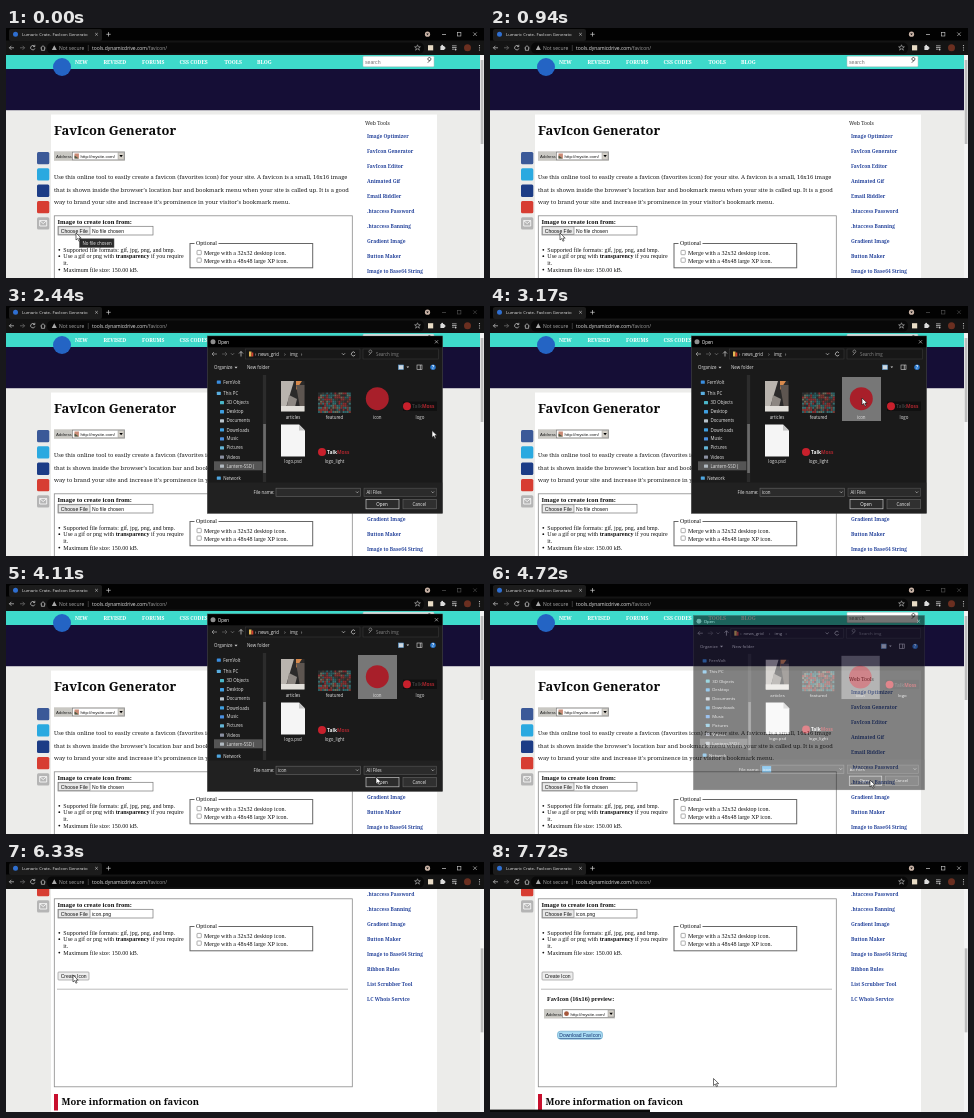
An HTML page that plays this animation: 478x250 px, repeating every 8000 ms.

```html
<!DOCTYPE html>
<html lang="en">
<head>
<meta charset="utf-8">
<title>FavIcon Generator</title>
<style>
html, body { margin: 0; width: 100%; height: 100%; overflow: hidden; background: #000; }
svg { display: block; width: 100%; height: 100%; }
text { white-space: pre; }
.ui { font-family: "Open Sans", sans-serif; }
.arial { font-family: "Liberation Sans", Arial, sans-serif; }
.times { font-family: "Liberation Serif", "Times New Roman", serif; }
.serif { font-family: "Noto Serif", Georgia, serif; }
.b { font-weight: bold; }
</style>
</head>
<body>
<svg id="stage" viewBox="0 0 478 250" preserveAspectRatio="none"></svg>
<script>
const LOOP = 8000;

// Markup helpers
const rect = (x, y, w, h, fill, more = '') =>
  `<rect x="${x}" y="${y}" width="${w}" height="${h}" fill="${fill}" ${more}/>`;
const frame = (x, y, w, h, stroke, fill = 'none', sw = 0.7, rx = 0) =>
  rect(x, y, w, h, fill, `stroke="${stroke}" stroke-width="${sw}" rx="${rx}"`);
const dot = (x, y, r, fill, more = '') => `<circle cx="${x}" cy="${y}" r="${r}" fill="${fill}" ${more}/>`;
const line = (d, stroke, sw = 0.7) => `<path d="${d}" fill="none" stroke="${stroke}" stroke-width="${sw}"/>`;
const shape = (d, fill) => `<path d="${d}" fill="${fill}"/>`;
const text = (cls, x, y, size, fill, str, more = '') =>
  `<text class="${cls}" x="${x}" y="${y}" font-size="${size}" fill="${fill}" ${more}>${str}</text>`;
const group = (id, body, more = '') => `<g id="${id}" ${more}>${body}</g>`;
const mid = 'text-anchor="middle"';
const cross = (x, y, r, c) => line(`M${x - r} ${y - r}l${2 * r} ${2 * r}m0 ${-2 * r}l${-2 * r} ${2 * r}`, c, 0.6);
const lens = (x, y, c) => line(`M${x + 1} ${y - 1}a1.5 1.5 0 1 0 -.1 .1l-2.6 2.6`, c, 0.8);

function addressBar(x, y, round) {
  return rect(x, y, 71, 9.5, '#c9c8c3') + frame(x + 18.5, y + 0.8, 52, 7.8, '#777', '#fff', 0.6) +
    text('arial', x + 2, y + 6.5, 4.3, '#222', 'Address') +
    (round ? dot(x + 22.5, y + 4.7, 2.4, '#a5573c')
           : rect(x + 20.5, y + 2.2, 4.4, 5, '#c98a75') + shape(`M${x + 20.5} ${y + 7.2}v-3l4.4 3z`, '#4a5a45')) +
    text('arial', x + 26.5, y + 6.6, 4.4, '#111', 'http://mysite.com/') +
    rect(x + 64, y + 1.5, 6, 6.4, '#d4d0c8', 'stroke="#888" stroke-width=".4"') +
    shape(`M${x + 65.4} ${y + 3.8}h3.4l-1.7 2.2z`, '#000');
}

function header() {
  const nav = [['NEW', 69], ['REVISED', 97.5], ['FORUMS', 136], ['CSS CODES', 173.5], ['TOOLS', 218.5], ['BLOG', 251]];
  return rect(0, 82, 478, 1, '#bcbac2') + rect(0, 41, 478, 41, '#150e36') + rect(0, 20, 478, 21, '#3edacb') +
    nav.map(([s, x]) => text('serif b', x, 36, 5.1, '#fff', s)).join('') +
    frame(357, 28.3, 71, 10.4, '#bbb', '#fff', 0.5, 1) +
    text('arial', 359, 35.5, 5.2, '#777', 'search') + lens(423.5, 33, '#333') +
    dot(56, 39, 9, '#2464c4');
}

function share() {
  const colors = ['#3b5998', '#2aa9e0', '#1c3c86', '#d73d32', '#b5b5b5'];
  return colors.map((c, i) => rect(31, 124 + i * 16.3, 12.3, 12.3, c, 'rx="1.5"')).join('') +
    line('M33.7 192.6h7v5.4h-7zl3.5 3 3.5 -3', '#fff', 0.8);
}

function sidebar() {
  const links = ['Image Optimizer', 'FavIcon Generator', 'FavIcon Editor', 'Animated Gif', 'Email Riddler',
    '.htaccess Password', '.htaccess Banning', 'Gradient Image', 'Button Maker', 'Image to Base64 String',
    'Ribbon Rules', 'List Scrubber Tool', 'LC Whois Service'];
  return text('serif', 359, 97.3, 5.1, '#222', 'Web Tools') +
    links.map((s, i) => text('serif b', 361, 110 + i * 15.02, 4.9, '#27459c', s)).join('');
}

function form() {
  const t = (x, y, s) => text('times', x, y, 6, '#111', s);
  const check = y => frame(191, y, 4.3, 4.3, '#777', '#fff', 0.6, 0.6);
  return frame(48.3, 187.8, 298, 188, '#8a8a8a', 'none', 0.8) +
    text('times b', 51.5, 196.3, 6.6, '#111', 'Image to create icon from:') +
    frame(52, 198.3, 95, 8.7, '#777', '#fff') + frame(52.4, 198.8, 31.6, 7.7, '#777', '#e9e9e9', 0.6) +
    text('arial', 54.8, 204.6, 5.05, '#111', 'Choose File') +
    `<text id="chosen" class="arial" x="86" y="204.6" font-size="5.05" fill="#111"></text>` +
    [221.8, 228.2, 241.6].map(y => dot(53.3, y, 0.9, '#111')).join('') +
    t(57.3, 223.6, 'Supported file formats: gif, jpg, png, and bmp.') +
    t(57.3, 230, 'Use a gif or png with <tspan font-weight="bold">transparency</tspan> if you require') +
    t(57.3, 236.8, 'it.') + t(57.3, 243.6, 'Maximum file size: 150.00 kB.') +
    frame(184, 215.5, 122.7, 24.3, '#666', 'none', 1) + rect(188.5, 213, 24, 5, '#fff') +
    t(190, 217.4, 'Optional') + check(222.4) + check(230) +
    t(198, 227, 'Merge with a 32x32 desktop icon.') + t(198, 234.7, 'Merge with a 48x48 large XP icon.') +
    frame(52, 261, 31, 8, '#888', '#eee', 0.6, 0.8) + text('arial', 54.7, 266.9, 5, '#111', 'Create Icon') +
    line('M51 278.2H342', '#aaa', 0.8);
}

const preview =
  text('times b', 57, 289.8, 6.2, '#111', 'FavIcon (16x16) preview:') + addressBar(54, 298, true) +
  frame(67.5, 320.2, 45, 8, '#5b9ec4', '#a9dcf3', 0.6, 3) +
  text('arial', 90, 326, 5, '#12306e', 'Download FavIcon', mid + ' text-decoration="underline"');

function page() {
  const para = ['Use this online tool to easily create a favicon (favorites icon) for your site. A favicon is a small, 16x16 image',
    "that is shown inside the browser's location bar and bookmark menu when your site is called up. It is a good",
    "way to brand your site and increase it's prominence in your visitor's bookmark menu."];
  return rect(0, 20, 478, 420, '#ececea') + rect(45, 86.5, 386, 350, '#fff') + header() + share() + sidebar() +
    text('serif b', 48, 106.7, 12.9, '#0a0a0a', 'FavIcon Generator') + addressBar(48, 123.3) +
    para.map((s, i) => text('serif', 48, 151 + i * 12.6, 5.78, '#1c1c1c', s)).join('') +
    form() + group('preview', preview) +
    rect(48, 383, 4, 16.5, '#c8102e') + text('serif b', 55.5, 394, 9.4, '#0a0a0a', 'More information on favicon');
}

function browser() {
  const c = '#cfcfcf';
  const controls = line('M436 6.5h4', c) + frame(451.3, 4.4, 3.6, 3.6, c, 'none', 0.6) + cross(469, 6.2, 1.8, c);
  return rect(0, 0, 478, 27, '#141414') + rect(0, 0, 478, 12.5, '#020202') +
    rect(3, 1, 93, 12, '#1c1c1c', 'rx="2"') + rect(41, 14.6, 377, 11, '#080808', 'rx="5"') +
    dot(9.5, 6.3, 2.5, '#2f6fd0') +
    text('ui', 16, 7.9, 4.3, '#e2e2e2', 'Lumaric Crate- FavIcon Generato') +
    cross(90.5, 6.3, 1.3, c) + line('M100.3 6.3h4.4m-2.2 -2.2v4.4', c) +
    dot(421.5, 6.2, 2.6, '#c9b3a6') + shape('M420.2 5.5h2.6l-1.3 1.7z', '#111') + group('controls', controls) +
    line('M8 19.8H3.4m2 -2l-2 2 2 2', c) + line('M14 19.8h4.6m-2 -2l2 2 -2 2', '#777') +
    line('M28.6 18.4a2.2 2.2 0 1 0 .3 2M28.8 16.8v1.8h-1.8', c) + line('M34.5 20l2.5 -2.3 2.5 2.3m-4.1 -.6v2.9h3.2v-2.9', c) +
    shape('M48.3 17.3l2.5 4.6h-5z', '#aaa') +
    text('ui', 53, 21.7, 5, '#a9a9a9', 'Not secure') + line('M82.3 17v6', '#666', 0.5) +
    text('ui', 86, 21.7, 4.95, '#e4e4e4', 'tools.dynamicdrive.com<tspan fill="#a0a0a0">/favicon/</tspan>') +
    line('M411.5 16.8l.8 2h2.1l-1.7 1.3.7 2.1-1.9-1.3-1.9 1.3.7-2.1-1.7-1.3h2.1z', '#bbb', 0.6) +
    rect(422, 17.2, 5.2, 5.2, '#e9dcc6') +
    rect(434.4, 18, 4, 4, '#ddd') + dot(436.2, 17.8, 1, '#ddd') + dot(438.5, 20, 1, '#ddd') +
    line('M446 17.8h4.6m-4.6 1.7h4.6m-4.6 1.7h2.4', c) + dot(449.6, 21.5, 0.9, c) + dot(461.5, 19.8, 3.5, '#6b2f20') +
    [17.6, 19.8, 22].map(y => dot(473.5, y, 0.6, c)).join('');
}

// Small colour mosaic standing in for a photo collage
function mosaic(x, y, cols, rows, size, colors) {
  let seed = 7, out = '';
  for (let i = 0; i < cols * rows; i++) {
    seed = (seed * 73 + 41) % 1009;
    out += rect(x + i % cols * size, y + Math.floor(i / cols) * size, size, size, colors[seed % colors.length]);
  }
  return out;
}

function files() {
  const label = (x, y, s) => text('ui', x, y, 4.4, '#e6e6e6', s, mid);
  const wordmark = (x, y, ink) => dot(x + 4, y + 4, 4, '#c8202c') +
    text('ui b', x + 9, y + 6, 4.9, ink, 'Talk<tspan fill="#a8262e">Moss</tspan>');
  return rect(275, 75, 23.5, 30.5, '#2b2a2a') + shape('M275 75h13l-9 30h-4z', '#b9b4ae') +
    shape('M290 75h6l-6 9z', '#d98a4c') + shape('M283 89l8 4 -3 12h-8z', '#8d8782') +
    shape('M290 79h8.5v26h-4z', '#5d5550') + rect(275, 100, 23.5, 5.5, '#e2dfda') +
    mosaic(312, 86.5, 16, 10, 2.05, ['#2a5f63', '#7a3a34', '#403a35', '#386f70', '#8a2d30', '#6b6a58', '#2b2f30']) +
    rect(352, 71, 39, 44, '#777', 'id="pick"') + dot(371.3, 92.7, 11.5, '#a81f2a') +
    rect(397, 95.5, 34, 9.5, '#101010') + wordmark(397, 96.3, '#3a3a3a') +
    shape('M275 118.5h18l6 6v26h-24z', '#f5f5f5') + shape('M293 118.5v6h6z', '#c4c4c4') +
    wordmark(312, 142, '#f2f2f2') +
    label(287, 113, 'articles') + label(328.5, 113, 'featured') + label(371.3, 113, 'icon') + label(414, 113, 'logo') +
    label(287, 157, 'logo.psd') + label(328.5, 157, 'logo_light');
}

function tree() {
  const items = [['FernVolt', 76, '#3a8ee0'], ['This PC', 87.3, '#5aaee0'], ['3D Objects', 96.6, '#4bb7c9'],
    ['Desktop', 105.7, '#3f9fe0'], ['Documents', 114.8, '#b9c4cc'], ['Downloads', 123.9, '#3f9fe0'], ['Music', 132.8, '#4a8fe0'],
    ['Pictures', 141.8, '#64b5d6'], ['Videos', 151, '#8a8fa0'], ['Lantern-SSD (', 160, '#b0b8bf'], ['Network', 172, '#4fa6df']];
  return rect(208, 155.3, 48.5, 9, '#555') +
    items.map(([s, y, c], i) => {
      const x = i > 1 && i < 10 ? 220.5 : 217.3;
      return rect(x - 6.5, y - 1.6, 4, 3.3, c, 'rx=".5"') + text('ui', x, y + 1.6, 4.4, '#e6e6e6', s);
    }).join('') +
    rect(256.8, 69, 3.4, 107, '#2c2c2c') + rect(257.2, 118, 2.7, 49, '#6b6b6b');
}

function dialog() {
  const c = '#d8d8d8', t = (x, y, s, f = '#e6e6e6', more) => text('ui', x, y, 4.4, f, s, more);
  return rect(201.5, 30, 235, 177.3, '#1a1a1a', 'stroke="#444" stroke-width=".6"') + rect(201.8, 30.3, 234.4, 11, '#000') +
    rect(201.8, 176.6, 234.4, 30.4, '#212121') +
    dot(207, 35.8, 2.5, '#8e8e8e') + t(211.8, 37.5, 'Open', '#fff') + cross(430.5, 35.8, 1.6, c) +
    line('M211 48h-5m2 -2l-2 2 2 2', '#aaa') + line('M216 48h5m-2 -2l2 2 -2 2', '#666') +
    line('M225 47.3l1.5 1.5 1.5 -1.5', '#888') + line('M235 50.5v-5m-2 2l2 -2 2 2', c) +
    frame(239.5, 43, 114.5, 10, '#383838', '#171717', 0.6) + rect(243, 45.5, 2.5, 5, '#e3b955') + rect(245.5, 46.5, 1.8, 4, '#d2402f') +
    t(249, 49.8, '›') + t(252.3, 49.8, 'news_grid') + t(278.3, 49.8, '›') + t(284, 49.8, 'img') + t(295, 49.8, '›') +
    line('M336 47.3l1.5 1.5 1.5 -1.5', c) + line('M349 46.8a2 2 0 1 0 .2 2', c) +
    frame(357, 43, 75.5, 10, '#383838', '#171717', 0.6) + lens(364.5, 47.5, '#888') + t(370, 49.7, 'Search img', '#888') +
    t(208, 63, 'Organize') + shape('M228.5 60.8h3l-1.5 1.8z', c) + t(241, 63, 'New folder') +
    frame(392.5, 59, 5, 4.5, '#5d9fd6', '#cfd8df', 0.6) + shape('M400.5 60.5h2.6l-1.3 1.6z', c) +
    frame(411, 59, 5, 4.5, c, 'none', 0.6) + line('M414.3 59v4.5', c) + dot(427, 61.3, 2.7, '#2c7bd0') +
    text('ui b', 427, 63, 4.4, '#fff', '?', mid) +
    tree() + files() +
    t(247.5, 188.2, 'File name:') + frame(270, 182.2, 84.5, 8.4, '#666', '#2b2b2b', 0.6) +
    rect(271.3, 183.2, 9.2, 6.4, '#3fa4e6', 'id="mark"') +
    `<text id="fileName" class="ui" x="272" y="188" font-size="4.4" fill="#eee"></text>` + line('M350 185.5l1.3 1.3 1.3 -1.3', c, 0.6) +
    frame(358, 182.2, 72.5, 8.4, '#555', '#2b2b2b', 0.6) + t(360.5, 188, 'All Files') + line('M425.5 185.5l1.3 1.3 1.3 -1.3', c, 0.6) +
    frame(360, 193.4, 33, 9.4, '#c4c4c4', '#2c2c2c', 0.7) + t(376, 199.7, 'Open', '#fff', mid) +
    frame(397, 193.4, 33.5, 9.4, '#666', '#303030', 0.6) + t(413.2, 199.7, 'Cancel', '#eee', mid);
}

// Dialog before its controls have been painted
const blank = rect(201.8, 30, 234.5, 177.3, '#f1f1f0', 'fill-opacity=".93"') +
  rect(201.8, 30, 234.5, 11, '#333') + rect(201.8, 67.5, 58.4, 109, '#222') +
  rect(254.5, 67.5, 5.5, 109, '#303030') + rect(254.5, 118, 5, 50, '#777') +
  line('M256 72l1.2 -1.2 1.2 1.2', '#ccc', 0.5) +
  rect(201.8, 176.5, 234.5, 30.8, '#3b3b3b') + dot(207, 35.8, 2.5, '#999') + text('ui', 211.8, 37.5, 4.4, '#fff', 'Open') +
  cross(430.5, 35.8, 1.6, '#ddd') +
  [[248, 183, 20, 7], [270, 182, 85, 8.5], [358.5, 182, 72, 8.5], [358.5, 193, 34, 10], [396.5, 193, 33.5, 10]]
    .map(([x, y, w, h]) => rect(x, y, w, h, '#fbfbfb')).join('');

const tooltip = frame(73.5, 210.8, 34.5, 8.6, '#555', '#2b2b2b', 0.5) + text('ui', 76.5, 216.7, 4.4, '#eee', 'No file chosen');

document.getElementById('stage').innerHTML =
  group('page', page()) +
  rect(474, 27, 4, 223, '#f4f4f4') + rect(474.7, 32, 2.7, 84, '#bdbdbd', 'id="thumb"') +
  browser() + group('tip', tooltip) + group('blank', blank) + group('dialog', dialog()) +
  rect(0, 247.6, 160, 2.4, '#0a0a0a', 'id="status"') +
  group('cursor', '<path d="M0 0v7l1.7-1.5 1.2 2.7 1.2-.5-1.2-2.6h2.3z" fill="#fff" stroke="#111" stroke-width=".6"/>');

const el = {};
document.querySelectorAll('[id]').forEach(n => el[n.id] = n);

const clamp = v => Math.max(0, Math.min(1, v));
const ramp = (t, a, b) => clamp((t - a) / (b - a));
const smooth = u => u * u * (3 - 2 * u);
const cubic = u => u < 0.5 ? 4 * u ** 3 : 1 - 4 * (1 - u) ** 3;
const show = (node, on) => node.setAttribute('visibility', on ? 'inherit' : 'hidden');
const write = (node, s) => { if (node.textContent !== s) node.textContent = s; };

// time, x, y of the pointer tip
const path = [[0, 70, 205], [900, 70, 205], [1300, 70.5, 206], [1720, 70.5, 206], [2420, 426, 124.5], [2560, 426, 124.5],
  [3000, 372, 92], [3440, 372, 92], [4060, 370, 193], [4200, 370, 193], [4480, 380, 196], [5110, 380, 196],
  [5600, 239, 208], [5940, 239, 208], [6280, 67, 113], [6480, 67, 113], [6720, 88, 171.5], [6940, 88, 171.5],
  [7440, 224, 217], [7610, 224, 217], [7710, 223.5, 216.5], [LOOP, 223.5, 216.5]];

function pointer(t) {
  const i = Math.max(1, path.findIndex(p => p[0] > t));
  const [a, x, y] = path[i - 1], [b, x2, y2] = path[i];
  const u = smooth(ramp(t, a, b));
  return [x + (x2 - x) * u, y + (y2 - y) * u];
}

function draw(t) {
  const scroll = 151 * cubic(ramp(t, 5595, 5890));
  el.page.setAttribute('transform', `translate(0 ${-scroll})`);
  el.thumb.setAttribute('y', 32 + scroll * 0.36);
  write(el.chosen, t < 4850 ? 'No file chosen' : 'icon.png');
  show(el.preview, t >= 6440);
  show(el.status, t >= 6950);
  el.tip.setAttribute('opacity', 1 - ramp(t, 720, 830));

  // The browser window is inactive while the dialog is open
  el.controls.setAttribute('opacity', t >= 1340 && t < 4820 ? 0.4 : 1);
  show(el.blank, t >= 1340 && t < 1560);
  el.blank.setAttribute('opacity', ramp(t, 1340, 1430));
  const close = ramp(t, 4620, 4820), k = 1 - 0.034 * close;
  show(el.dialog, t >= 1560 && close < 1);
  el.dialog.setAttribute('opacity', 1 - 0.9 * close);
  el.dialog.setAttribute('transform', `translate(319 118.5) scale(${k}) translate(-319 -118.5)`);
  show(el.pick, t >= 2880);
  el.pick.setAttribute('fill', t < 3100 ? '#3a3a3a' : '#777');
  write(el.fileName, t >= 3100 ? 'icon' : '');
  show(el.mark, t >= 4620);

  const [x, y] = pointer(t);
  el.cursor.setAttribute('transform', `translate(${x} ${y})`);
}

const start = performance.now();
function tick() {
  draw((performance.now() - start) % LOOP);
  requestAnimationFrame(tick);
}
tick();
</script>
</body>
</html>
```
